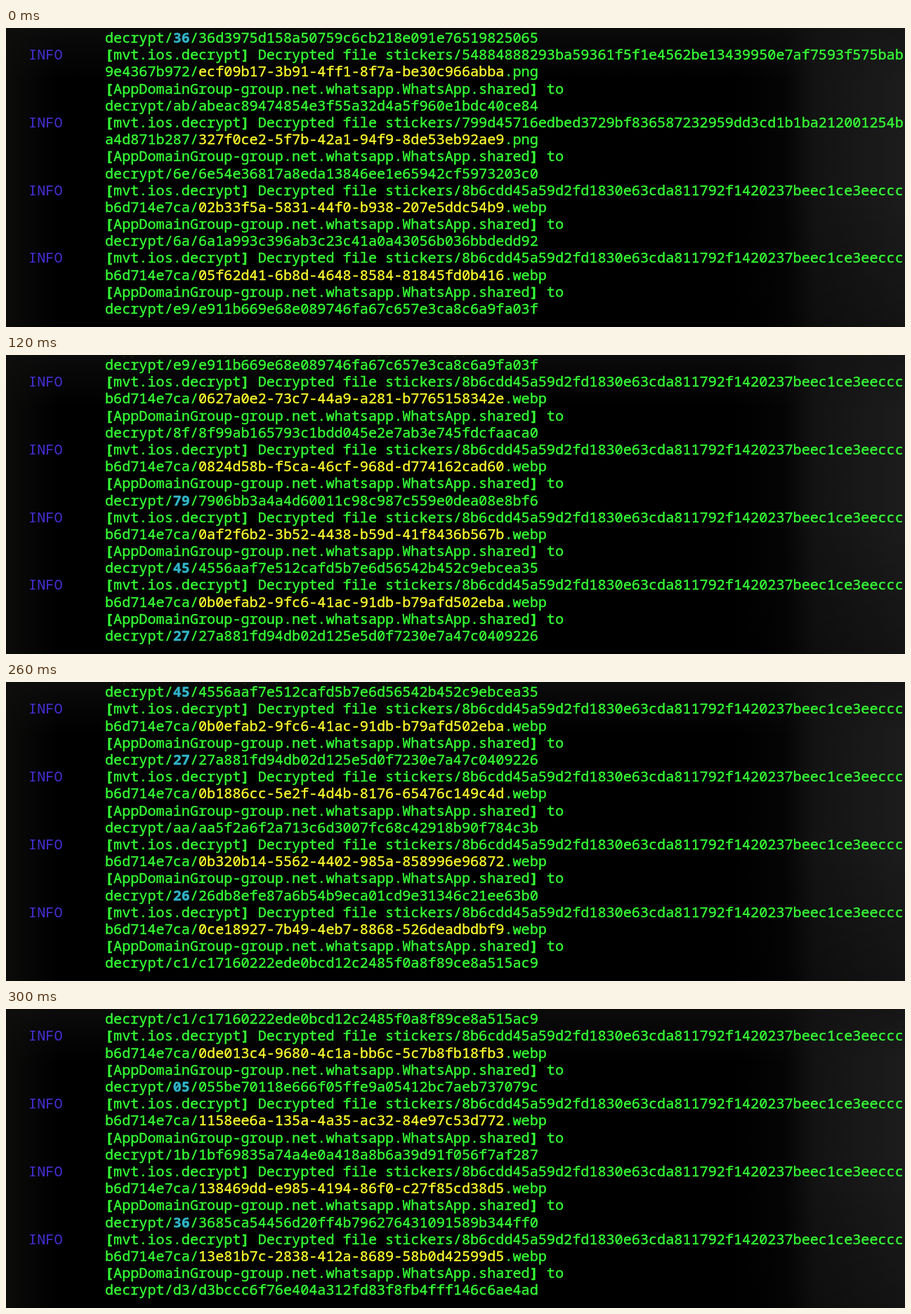
These frames come from a looping animation (1280 by 427 pixels, 320 ms). An HTML page:

```html
<!DOCTYPE html>
<html lang="en">
<head>
<meta charset="utf-8">
<title>Decryption log</title>
<style>
  html, body { margin: 0; width: 100%; height: 100%; overflow: hidden; background: #000; }
  .stage {
    position: relative; width: 1280px; height: 427px; overflow: hidden;
    background:
      linear-gradient(90deg, rgba(16, 16, 15, .7), transparent 75px),
      linear-gradient(rgba(18, 18, 18, .6), transparent 75px),
      linear-gradient(transparent 55%, rgba(0, 0, 0, .3)),
      linear-gradient(90deg, #000 1040px, #050505 1110px, #131313 1150px, #1c1c1d 1280px);
  }
  .view { position: absolute; top: 2px; left: 0; width: 1280px; height: 413px; overflow: hidden; }
  .log {
    position: absolute; top: -1px; left: 141px;
    font: 20.17px/24.1875px "Noto Sans Mono", "DejaVu Sans Mono", monospace;
    font-variant-ligatures: none;
    color: #35ff35;
    -webkit-text-stroke: .4px;
    animation: scroll 320ms step-end infinite;
  }
  .row { position: relative; height: 24.1875px; white-space: pre; }
  .level { position: absolute; left: -108.9px; color: #4630d6; -webkit-text-stroke: 0; }
  .id { color: #fbfb2e; }
  .num { color: #30b4c8; font-weight: 700; }
  b { font-weight: 700; }
  /* one log entry is four rows, 96.75px */
  @keyframes scroll {
    0% { transform: translateY(0); }
    6.25% { transform: translateY(-387px); }
    43.75% { transform: translateY(-484px); }
    50% { transform: translateY(-677px); }
    87.5% { transform: translateY(-871px); }
    93.75%, 100% { transform: translateY(-1064px); }
  }
</style>
</head>
<body>
<div class="stage"><div class="view"><div class="log" id="log"></div></div></div>
<script>
  const packs = {
    a: ['54884888293ba59361f5f1e4562be13439950e7af7593f575bab', '9e4367b972', 'png'],
    b: ['799d45716edbed3729bf836587232959dd3cd1b1ba212001254b', 'a4d871b287', 'png'],
    c: ['8b6cdd45a59d2fd1830e63cda811792f1420237beec1ce3eeccc', 'b6d714e7ca', 'webp']
  };

  // pack, sticker id, output hash
  const entries = `
    a ecf09b17-3b91-4ff1-8f7a-be30c966abba abeac89474854e3f55a32d4a5f960e1bdc40ce84
    b 327f0ce2-5f7b-42a1-94f9-8de53eb92ae9 6e54e36817a8eda13846ee1e65942cf5973203c0
    c 02b33f5a-5831-44f0-b938-207e5ddc54b9 6a1a993c396ab3c23c41a0a43056b036bbdedd92
    c 05f62d41-6b8d-4648-8584-81845fd0b416 e911b669e68e089746fa67c657e3ca8c6a9fa03f
    c 0627a0e2-73c7-44a9-a281-b7765158342e 8f99ab165793c1bdd045e2e7ab3e745fdcfaaca0
    c 0824d58b-f5ca-46cf-968d-d774162cad60 7906bb3a4a4d60011c98c987c559e0dea08e8bf6
    c 0af2f6b2-3b52-4438-b59d-41f8436b567b 4556aaf7e512cafd5b7e6d56542b452c9ebcea35
    c 0b0efab2-9fc6-41ac-91db-b79afd502eba 27a881fd94db02d125e5d0f7230e7a47c0409226
    c 0b1886cc-5e2f-4d4b-8176-65476c149c4d aa5f2a6f2a713c6d3007fc68c42918b90f784c3b
    c 0b320b14-5562-4402-985a-858996e96872 26db8efe87a6b54b9eca01cd9e31346c21ee63b0
    c 0ce18927-7b49-4eb7-8868-526deadbdbf9 c17160222ede0bcd12c2485f0a8f89ce8a515ac9
    c 0de013c4-9680-4c1a-bb6c-5c7b8fb18fb3 055be70118e666f05ffe9a05412bc7aeb737079c
    c 1158ee6a-135a-4a35-ac32-84e97c53d772 1bf69835a74a4e0a418a8b6a39d91f056f7af287
    c 138469dd-e985-4194-86f0-c27f85cd38d5 3685ca54456d20ff4b796276431091589b344ff0
    c 13e81b7c-2838-412a-8689-58b0d42599d5 d3bccc6f76e404a312fd83f8fb4fff146c6ae4ad
  `.trim().split('\n').map(line => line.trim().split(' '));

  const row = html => `<div class="row">${html}</div>`;
  const span = (cls, text) => `<span class="${cls}">${text}</span>`;
  const tag = text => `<b>[</b>${text}<b>]</b>`;

  // Folder names made only of digits are highlighted.
  function output(hash) {
    const dir = hash.slice(0, 2);
    return row(`decrypt/${/^\d+$/.test(dir) ? span('num', dir) : dir}/${hash}`);
  }

  function entry([key, id, hash]) {
    const [head, tail, ext] = packs[key];
    return row(span('level', 'INFO') + tag('mvt.ios.decrypt') + ` Decrypted file stickers/${head}`) +
      row(`${tail}/${span('id', id)}.${ext}`) +
      row(tag('AppDomainGroup-group.net.whatsapp.WhatsApp.shared') + ' to') +
      output(hash);
  }

  document.getElementById('log').innerHTML =
    output('36d3975d158a50759c6cb218e091e76519825065') + entries.map(entry).join('');
</script>
</body>
</html>
```
